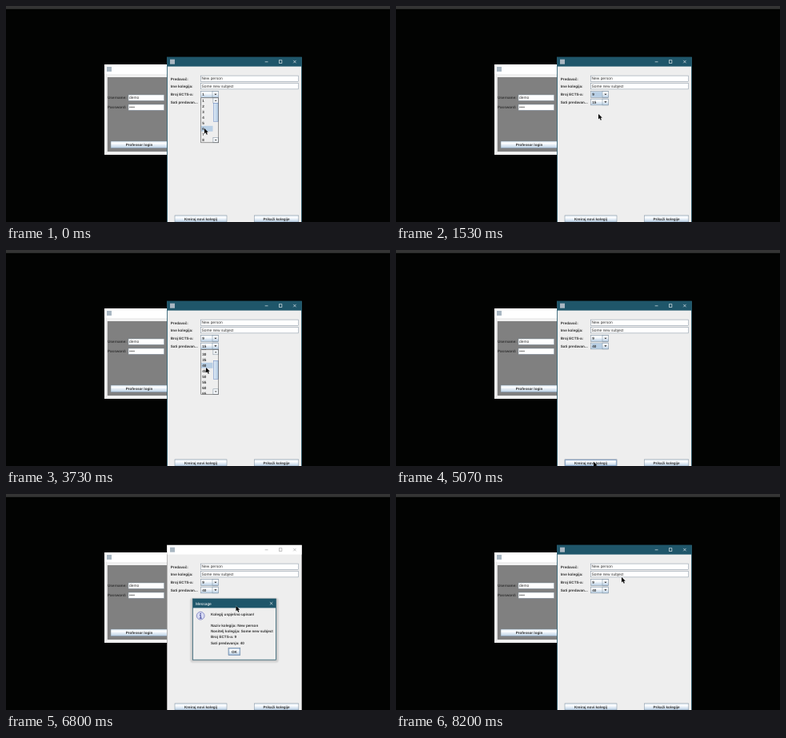
Write an HTML page that moves like this. It is 480 px wide and 270 px high and loops after 8.27 s.

```html
<!DOCTYPE html>
<html lang="hr">
<head>
<meta charset="utf-8">
<title>Novi kolegij</title>
<style>
html, body { margin: 0; height: 100%; overflow: hidden; background: #020302; }
svg { display: block; width: 100vw; height: 100vh; }
text { font: bold 4.6px "Liberation Sans", Arial, sans-serif; fill: #333; text-rendering: geometricPrecision; white-space: pre; }
.plain { font-weight: normal; font-size: 4.9px; }
.mid { text-anchor: middle; }
</style>
</head>
<body>
<svg id="stage" viewBox="0 0 480 270">
  <defs>
    <linearGradient id="metal" x2="0" y2="1">
      <stop offset="0" stop-color="#dde8f3"/><stop offset=".3" stop-color="#fff"/>
      <stop offset=".5" stop-color="#eaf1f8"/><stop offset="1" stop-color="#b8cfe5"/>
    </linearGradient>
    <linearGradient id="thumb">
      <stop offset="0" stop-color="#e3edf7"/><stop offset="1" stop-color="#b0c9e3"/>
    </linearGradient>
  </defs>
</svg>
<script>
const LOOP = 8270, FPS = 15;
const TEAL = '#1f566a', PANEL = '#eee', EDGE = '#7a8a99', PICK = '#b8cfe5';
const ROW = 7, LIST_H = 56, TRACK_H = 43;
const stage = document.getElementById('stage');

function el(tag, attrs, parent = stage) {
  const node = document.createElementNS('http://www.w3.org/2000/svg', tag);
  set(node, attrs);
  parent.append(node);
  return node;
}
function set(node, attrs) {
  for (const key in attrs) node.setAttribute(key, attrs[key]);
}
const show = (node, on) => set(node, { display: on ? 'inline' : 'none' });
const group = (parent) => el('g', {}, parent);
const rect = (x, y, width, height, fill, parent, more) =>
  el('rect', { x, y, width, height, fill, ...more }, parent);
const boxed = (x, y, w, h, fill, parent, stroke = EDGE) =>
  rect(x, y, w, h, fill, parent, { stroke, 'stroke-width': .5 });
const line = (d, stroke, parent, width = .6) =>
  el('path', { d, stroke, fill: 'none', 'stroke-width': width }, parent);
function text(x, y, str, parent, cls = '', fill = '#333') {
  const node = el('text', { x, y, class: cls, style: `fill:${fill}` }, parent);
  node.textContent = str;
  return node;
}
const arrow = (x, y, dir, parent, s = 1.7) =>
  el('path', { d: `M${x - s} ${y - dir * s / 2}h${2 * s}l${-s} ${dir * s}z`, fill: '#222' }, parent);
const cross = (x, y, stroke, parent) =>
  line(`M${x - 1.7} ${y - 1.7}l3.4 3.4m0-3.4l-3.4 3.4`, stroke, parent);

function button(x, y, w, h, label, parent) {
  const face = boxed(x, y, w, h, 'url(#metal)', parent);
  const ring = rect(x + .7, y + .7, w - 1.4, h - 1.4, 'none', parent, { stroke: '#7f9fc4', 'stroke-width': .8 });
  text(x + w / 2, y + h / 2 + 1.6, label, parent, 'mid');
  return (hover, pressed) => {
    show(ring, hover);
    set(face, { fill: pressed ? PICK : 'url(#metal)', stroke: hover ? '#566880' : EDGE });
  };
}

function field(x, y, w, h, value, parent) {
  boxed(x, y, w, h, '#fff', parent);
  text(x + 1, y + h / 2 + 1.7, value, parent, 'plain');
}

function combo(y, parent) {
  boxed(243.7, y, 22, 7.8, 'url(#metal)', parent);
  const focus = rect(244.4, y + .7, 13.4, 6.4, PICK, parent);
  boxed(258, y, 7.7, 7.8, 'url(#metal)', parent);
  arrow(261.9, y + 4, 1, parent);
  const value = text(245.2, y + 5.4, '', parent);
  return (str, focused) => {
    value.textContent = str;
    show(focus, focused);
  };
}

function dropList(id, top, items) {
  const g = group();
  const total = items.length * ROW;
  rect(243.7, top, 22, LIST_H, PANEL, g);
  rect(243.7, top, 15, LIST_H, '#eee', el('clipPath', { id }, g));
  const rows = group(el('g', { 'clip-path': `url(#${id})` }, g));
  const pick = rect(243.7, 0, 15, ROW, PICK, rows);
  items.forEach((item, i) => text(245.2, top + i * ROW + 5.2, item, rows));
  for (const [y, dir] of [[top, -1], [top + LIST_H - 6.5, 1]]) {
    boxed(258.9, y, 6.6, 6.5, '#f2f5f8', g);
    arrow(262.2, y + 3.3, dir, g, 1.4);
  }
  const thumb = boxed(259.3, 0, 6, TRACK_H * LIST_H / total, 'url(#thumb)', g, '#6382bf');
  rect(243.7, top, 22, LIST_H, 'none', g, { stroke: '#555', 'stroke-width': .6 });
  return (open, scroll, hot) => {
    show(g, open);
    set(rows, { transform: `translate(0 ${-scroll})` });
    set(pick, { y: top + hot * ROW });
    set(thumb, { y: top + 6.5 + scroll * TRACK_H / total });
  };
}

// Desktop and login window
rect(0, 0, 480, 270, '#020302');
rect(0, 0, 480, 3.8, '#353535');
rect(123, 73, 79, 113, '#f0f0f0');
rect(123, 73, 79, 12, '#fff');
rect(126, 76, 6, 6, '#a9b7c2');
rect(126.8, 89, 75, 93, '#808080');
text(127, 116.2, 'Username:');
text(127, 128.2, 'Password:');
field(153, 111, 44.7, 7.3, 'demo');
field(153, 123, 44.7, 7.3, '••••');
button(131, 169, 71, 8.6, 'Professor login')(false, false);

// Course window
const frame = rect(201.4, 64, 168.2, 212, PANEL, stage, { 'stroke-width': .8 });
const bar = rect(201.4, 64, 168.2, 11.6, TEAL);
rect(205, 66.7, 6, 6, '#a9b7c2');
const controls = group();
line('M323.7 69.8h3.8', 'currentColor', controls);
rect(341.3, 67.8, 3.6, 3.6, 'none', controls, { stroke: 'currentColor', 'stroke-width': .6 });
cross(360.9, 69.6, 'currentColor', controls);
['Predavač:', 'Ime kolegija:', 'Broj ECTS-a:', 'Sati predavan...']
  .forEach((label, i) => text(205.8, 92.6 + i * 9.7, label));
field(243.5, 87.1, 122.2, 7.2, 'New person');
field(243.5, 96.7, 122.2, 7.2, 'Some new subject');
const points = combo(106.5), hours = combo(116.1);
const create = button(211, 261.9, 65, 8.1, 'Kreiraj novi kolegij');
button(310.3, 261.9, 55.5, 8.1, 'Prikaži kolegije')(false, false);
const count = (from, step) => Array.from({ length: 15 }, (_, i) => from + i * step);
const pointList = dropList('clipA', 114.8, count(1, 1));
const hourList = dropList('clipB', 124.3, count(15, 5));

// Message dialog
const dialog = group();
for (let i = 4; i > 0; i--)
  rect(233.6 - i, 131.5 - i / 2, 103.8 + 2 * i, 75.6 + 1.6 * i, '#000', dialog, { opacity: .05, rx: i });
rect(233.6, 131, 103.8, 76.2, PANEL, dialog, { stroke: TEAL, 'stroke-width': .7 });
rect(233.6, 131, 103.8, 11.4, TEAL, dialog);
text(237, 138.6, 'Message', dialog, 'plain', '#fff');
cross(331.6, 136.7, '#fff', dialog);
el('circle', { cx: 243.2, cy: 152.2, r: 4.9, fill: '#d9dcf4', stroke: '#8d92c8', 'stroke-width': 1 }, dialog);
rect(242.5, 149, 1.5, 1.4, '#454b9c', dialog);
line('M242 151.6h1.3v3.6m-1.5 0h3', '#454b9c', dialog, 1);
[[151.7, 'Kolegij uspješno upisan!'],
 [165.6, 'Naziv kolegija: New person'],
 [172.9, 'Nositelj kolegija: Some new subject'],
 [180.2, 'Broj ECTS-a: 9'],
 [187.5, 'Sati predavanja: 40']].forEach(([y, str]) => text(256, y, str, dialog));
const ok = button(278, 192.3, 14.8, 9.4, 'OK', dialog);

const cursor = el('path', {
  d: 'M0 0V6.5L1.5 5.1 2.7 7.8 3.9 7.2 2.7 4.7H4.8Z',
  fill: '#000', stroke: '#fff', 'stroke-width': .35, 'paint-order': 'stroke'
});

// Tracks: [step, value...] at 15 steps per second
const path = [
  [0, 248, 153], [10, 248, 153], [16, 253, 135], [25, 253, 135], [30, 262, 119], [33, 262, 119],
  [38, 252, 141], [42, 262, 131.5], [45, 262, 131.5], [50, 262, 139.1], [52, 262, 139.1],
  [56, 250, 147], [62, 250, 147], [75, 247, 264], [76, 247, 264.7], [88, 247, 264.7],
  [97, 268, 198], [102, 287.5, 140], [109, 284, 195], [115, 284, 195], [123, 282, 104]
];
const drag = [[45, 0], [50, 18.5]];
const hotHour = [[0, 0], [35, 1], [37, 2], [41, 1], [55, 5]];
const fade = [[85, .3, .93], [86, .65, .965], [87, .88, .985], [88, 1, 1], [115, .6, .97], [116, .2, .94], [117, 0, .92]];

const held = (track, k) => track.filter(p => p[0] <= k).pop() || track[0];
function eased(track, k) {
  const a = held(track, k), b = track.find(p => p[0] > k);
  if (!b || k < a[0]) return a.slice(1);
  const u = (k - a[0]) / (b[0] - a[0]), s = u * u * (3 - 2 * u);
  return a.slice(1).map((v, i) => v + (b[i + 1] - v) * s);
}
const within = (k, from, to) => k >= from && k < to;

function draw(ms) {
  const k = Math.floor((ms % LOOP + 5) * FPS / 1000);
  const [x, y] = eased(path, k);
  set(cursor, { transform: `translate(${x} ${y})` });

  const active = !within(k, 85, 115);
  set(bar, { fill: active ? TEAL : '#fff' });
  set(frame, { stroke: active ? TEAL : '#aaa' });
  set(controls, { color: active ? '#fff' : '#999' });

  const wheel = k < 6 ? 0 : k < 8 ? 21 : 42;
  pointList(k < 23, wheel, k < 11 ? 5 : Math.floor((y - 114.8 + wheel) / ROW));
  points(k < 23 ? '1' : '9', within(k, 23, 32));
  hourList(within(k, 32, 63), eased(drag, k)[0], held(hotHour, k)[1]);
  hours(k < 63 ? '15' : '40', within(k, 63, 80));
  create(within(k, 74, 90), within(k, 80, 85));

  const [, alpha, scale] = held(fade, k);
  show(dialog, k >= 85 && alpha > 0);
  set(dialog, {
    opacity: alpha,
    transform: `translate(285.5 169) scale(${scale}) translate(-285.5 -169)`
  });
  ok(true, k === 112);
}

const start = performance.now();
function tick() {
  draw(performance.now() - start);
  requestAnimationFrame(tick);
}
tick();
</script>
</body>
</html>
```
